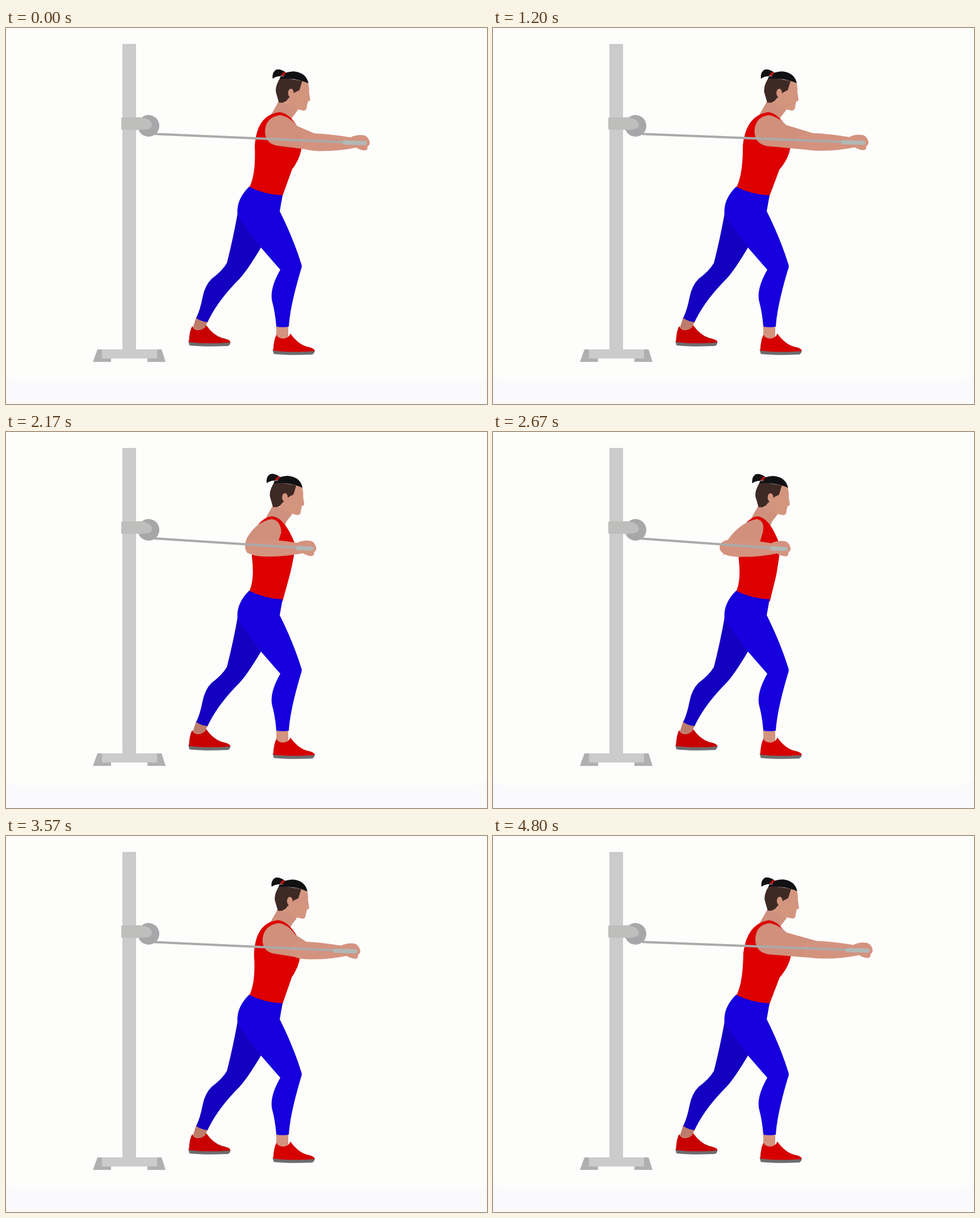
An HTML page for the animation above (4830 ms loop, 847 px wide and 661 px high).

```html
<!DOCTYPE html>
<html lang="en">
<head>
<meta charset="utf-8">
<title>Cable press</title>
<style>
  html, body { margin: 0; height: 100%; overflow: hidden; background: #fafafc; }
  svg { display: block; width: 847px; height: 661px; }
</style>
</head>
<body>
<svg viewBox="0 0 847 661">
  <defs>
    <g id="shoe">
      <path fill="#6c6c6e" d="M321 550L395 551Q396 556 391 559Q350 561 323 558Z"/>
      <path d="M328 524Q323 532 322 552Q350 556 395 553Q396 548 381 545Q366 541 352 522Q350 530 340 531Q330 531 328 524Z"/>
    </g>
  </defs>
  <rect y="-30" width="847" height="651" rx="20" fill="#fdfdfc"/>

  <g id="machine">
    <path fill="#cbcbcb" d="M205 28H229V565H266V581H168V565H205Z"/>
    <path fill="#b0b0b2" d="M161 565H169V581H185V587H153ZM266 565H274L281 587H249V581H266Z"/>
    <circle cx="251" cy="172" r="19" fill="#a7a7a9"/>
    <path fill="#bebebd" d="M205 157H238Q257 160 257 171Q256 177 248 178L240 179H205Q203 179 203 177V159Q203 157 205 157Z"/>
  </g>

  <path fill="#bd7c6a" d="M335 508L356 515L349 528Q341 534 329 527Z"/>
  <path fill="#1400c0" d="M408 325Q400 370 389 413Q381 427 362 441Q350 453 346 474Q342 495 335 510Q344 516 355 517Q372 480 412 440Q425 426 449 386L430 340Z"/>
  <path fill="#d4937f" d="M476 520H497V546H476Z"/>
  <use href="#shoe" fill="#c80000"/>
  <use href="#shoe" x="148.5" y="15" fill="#d60000"/>

  <g id="head">
    <path fill="#cf917d" d="M487 126L471 154L490 172L507 163L510 156L520 143Z"/>
    <path fill="#d4957f" d="M500 90L536 92Q540 104 539 112L541 126Q541 128 537 129L535 138Q535 144 530 145Q520 144 503 136L494 128Z"/>
    <path fill="#3e2a24" d="M489 86Q478 103 481 114L486 131H493Q499 129 502 124L514 113L522 109L527 93Z"/>
    <ellipse cx="507" cy="114" rx="5" ry="7.5" fill="#d4957f"/>
    <path fill="#111114" d="M487 89Q491 77 512 76Q534 78 538 97Q525 91 510 89.500Q497 88 487 89ZM497 77Q488 71 481 73Q473 78 475 89Q482 83 494 85Z"/>
    <path fill="#b01414" d="M494 77L499 78L493 85L489 83Z"/>
  </g>

  <path id="torso" fill="#dc0000"/>
  <path fill="#1600dd" d="M428 279Q455 293 487 294L482 322Q506 370 520 415Q522 419 519 426Q500 490 498 525Q487 527 476 525Q474 500 469 482Q463 460 483 425L449 386L408 330Q404 303 428 279Z"/>
  <path id="upper" fill="#d0907c"/>
  <path id="fore" fill="#d4937f" d="M-98 -16Q-70 -15 -34 -9Q-24 -14 -14 -13Q-3 -13 0 0Q0 5 -4 7Q-3 13 -8 14Q-16 14 -24 9Q-52 15 -84 15Q-122 16 -125 0Q-126 -16 -98 -16Z"/>
  <path id="rope" fill="none" stroke="#a9aaa9" stroke-width="4"/>
  <path id="grip" fill="none" stroke="#b2b8b5" stroke-width="7.5" stroke-linecap="round"/>
</svg>
<script>
const LOOP = 4830, REP = 3680, BACK = 524, REACH = 166;
const el = id => document.getElementById(id);
const [head, torso, upper, fore, rope, grip] =
  ['head', 'torso', 'upper', 'fore', 'rope', 'grip'].map(el);

// Each shape in three poses: arm bent, halfway, straight.
const torsoPoses = [
  'M428 281Q438 260 433 220Q430 155 468 148Q490 150 508 195Q510 208 500 250L487 298Q450 304 428 281Z',
  'M428 281Q440 258 436 210Q437 152 478 148Q498 150 516 185Q522 218 503 248L486 298Q450 304 428 281Z',
  'M428 281Q440 262 443 205Q452 155 489 148Q508 150 522 180Q540 210 505 250L486 298Q450 304 428 281Z'
];
const armPoses = [
  'M468 153Q484 156 484 177L479 192L435 216L424 213Q416 203 424 186Q440 158 468 153Z',
  'M479 153Q496 156 507 174L522 187L520 216L467 207Q448 202 449 182Q452 157 479 153Z',
  'M490 153Q506 157 519 168L590 184L583 214L490 210Q465 207 465 182Q467 156 490 153Z'
];

// Quadratic blend through the three poses at q = 0, m and 1.
function blend(poses, q, m = 0.4825) {
  const w = [(q - m) * (q - 1) / m, q * (q - 1) / (m * (m - 1)), q * (q - m) / (1 - m)];
  const rows = poses.map(d => d.match(/\d+/g));
  let i = 0;
  return poses[0].replace(/\d+/g, () => {
    const v = rows.reduce((sum, row, k) => sum + w[k] * row[i], 0);
    i++;
    return v.toFixed(2) + ' ';
  });
}

const ease = x => (1 - Math.cos(Math.PI * Math.min(1, Math.max(0, x)))) / 2;

function reachAt(t) {
  const s = t < 655 ? t + REP : t;
  if (s < 2650) return 1 - ease((s - 655) / 1995);
  return ease((s - 2650) / 1630) - ease((s - 655 - REP) / 1995);
}

function draw(now) {
  const x = BACK + REACH * reachAt(now % LOOP);
  const q = (x - 545) / 143, y = 204 - 4 * q;
  head.setAttribute('transform', `translate(${16 * (q - 1)} ${1 - q})`);
  torso.setAttribute('d', blend(torsoPoses, q));
  upper.setAttribute('d', blend(armPoses, q));
  fore.setAttribute('transform', `translate(${x} ${y})`);
  rope.setAttribute('d', `M${260 + 3 * q} ${187 - q}L${x - 8} ${y + 1}`);
  grip.setAttribute('d', `M${x - 32 - 12 * Math.min(1, Math.max(0, 2 * q))} ${y}L${x - 9} ${y + 1}`);
  requestAnimationFrame(draw);
}
draw(0);
</script>
</body>
</html>
```
